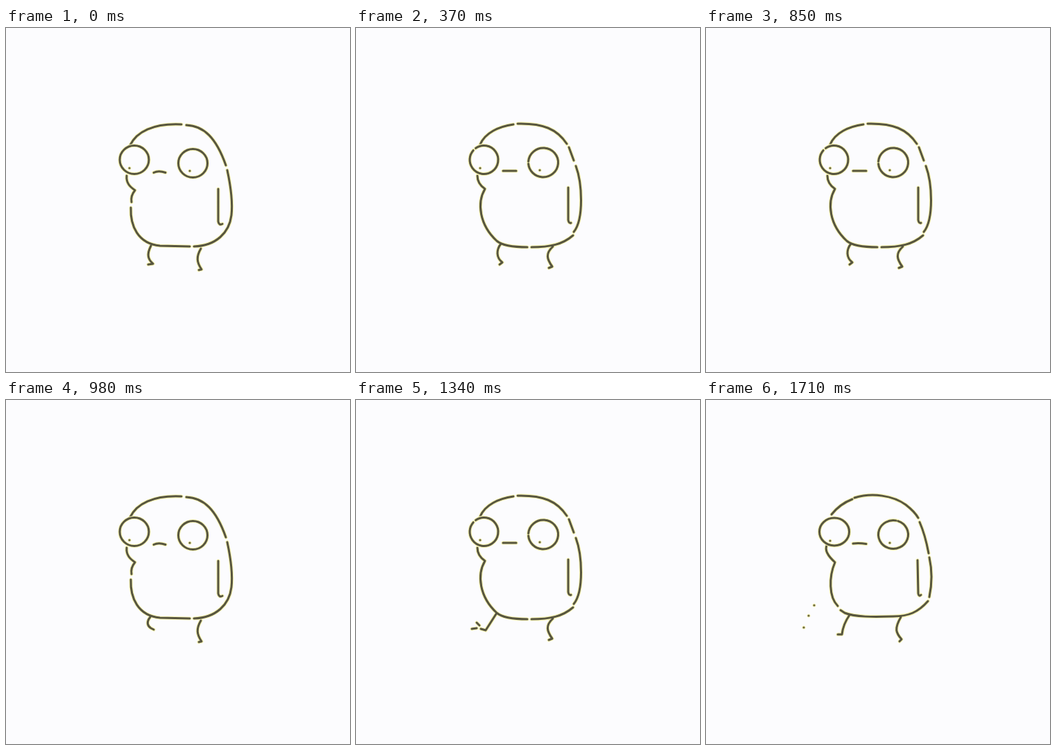
An HTML page with a canvas for the animation above (1.84 s loop, 496 px wide and 496 px high).

```html
<!DOCTYPE html>
<html lang="en">
<head>
<meta charset="utf-8">
<title>Little kick</title>
<style>
html, body { margin: 0; width: 100%; height: 100%; overflow: hidden; background: #fcfcfe; }
canvas { display: block; }
</style>
</head>
<body>
<canvas id="stage" width="496" height="496"></canvas>
<script>
const ctx = document.getElementById('stage').getContext('2d');
const LOOP = 1840;
const STARTS = [0, 120, 250, 370, 490, 610, 730, 850, 980, 1100, 1220, 1340, 1460, 1590, 1710];

// Four hand-drawn variants cycle to make the outline wobble.
// eyes: x, y, rx, ry, gap angle and gap size in degrees
const poses = [
  {
    body: 'M179 169C188 150 212 137 253 139M260 140C285 141 303 158 317 198M319 205C324 228 327 252 325 270C322 295 303 314 271 315M265 315L222 314C190 311 179 285 180 259M181 251C180 245 181 240 186 234C179 229 173 224 174 213',
    eyes: [[185, 190, 21, 20.5, 0, 0], [269.5, 195, 21, 20.5, 0, 0]],
    pupils: [[178, 202], [265, 206]],
    mouth: 'M213 208.5Q220 205 230 208.5',
    arm: 'M306 232L306 279Q307 285 312 282.5',
    left: 'M209 314C203 326 204 333 212 340L205 341',
    right: 'M281 318C274 330 275 338 282 348L278 349'
  },
  {
    body: 'M180 166C186 152 200 146 221 139M227 136.5C270 133 300 147 314 191M316 195C327 236 329 265 323 283C320 293 313 299 305 303M301 305C275 313 238 315 209 309C192 304 184 292 181 275M180 271C179 255 181 245 186 235C178 228 172 219 172 209',
    eyes: [[184.5, 189, 21.5, 20, 271, 12], [270, 193, 21.5, 20.5, 145, 10]],
    pupils: [[178, 201], [265, 205]],
    mouth: 'M212 208Q220 205 230 208',
    arm: 'M305 231C304 255 304 275 306 280Q308 284 311 282',
    left: 'M208 311C201 322 204 331 211 337L206 339',
    right: 'M283 312C273 325 273 333 282 345L278 347'
  },
  {
    body: 'M181 165C189 155 198 148 211 143M214 141C240 133 270 138 288 151C297 158 302 163 306 170M308 176C315 192 318 205 321 221M322 227C326 245 326 265 322 284M320 290C306 306 292 312 270 312C240 313 215 313 200 307L194 303M190 297C177 284 177 255 186 234C177 226 171 217 174 210',
    eyes: [[185, 190, 21.5, 20, 0, 0], [270, 194, 21.5, 20.5, 285, 8]],
    pupils: [[179, 203], [265, 206]],
    mouth: 'M212 207Q221 206 231 207.5',
    arm: 'M305 231L306 279Q307 284 310 281',
    left: 'M208 310C201 321 204 331 211 337L206 339',
    right: 'M281 313C271 330 274 336 282 345L279 348'
  },
  {
    body: 'M179 168C186 151 206 142 227 139M233 138C270 137 290 146 304 167M307 172L314 191M317 199C326 223 329 275 314 294M313 299C298 312 280 316 253 316M247 316C225 316 210 313 203 307C178 284 174 252 186 232C180 228 175 222 175 213',
    eyes: [[184.5, 190, 20.5, 20.5, 228, 13], [270, 194, 21.5, 21, 180, 9]],
    pupils: [[179, 202], [265, 205]],
    mouth: 'M212 206L231 206',
    arm: 'M306 230L306 277Q307 282 310 281',
    left: 'M209 311C202 320 202 331 211 338L207 341',
    right: 'M284 315C273 325 275 333 283 344L278 346'
  }
];

// Left leg during the wind-up and kick
const kick = {
  8: 'M208 313C202 320 204 326 209 329L213 331',
  9: 'M206 309C203 315 205 320 208 321L215 321',
  10: 'M205 309C205 316 210 320 218 317',
  11: 'M203 307L187 332L180 330M167 330L174 329M174 321L178 325',
  12: 'M204 309L188 333L181 331',
  13: 'M206 310C199 320 194 329 192 336L186 335',
  14: 'M207 310C200 320 197 329 196 338L190 338'
};
const specks = [[141, 328], [148, 311], [156, 296]];

function ink(path) {
  for (const [width, color] of [[5.2, '#f5f2b4'], [3, '#57553f']]) {
    ctx.lineWidth = width;
    ctx.strokeStyle = color;
    ctx.stroke(path);
  }
}

function dot(x, y) {
  for (const [r, color] of [[2.5, '#f5f2b4'], [1.6, '#68653f']]) {
    ctx.fillStyle = color;
    ctx.beginPath();
    ctx.arc(x, y, r, 0, Math.PI * 2);
    ctx.fill();
  }
}

function eye([x, y, rx, ry, gap, size]) {
  const path = new Path2D();
  const rad = Math.PI / 180;
  path.ellipse(x, y, rx, ry, 0, (gap + size / 2) * rad, (gap + 360 - size / 2) * rad);
  ink(path);
}

function draw(step) {
  const pose = poses[step % 4];
  ctx.fillStyle = '#fcfcfe';
  ctx.fillRect(0, 0, 496, 496);
  ctx.lineCap = ctx.lineJoin = 'round';
  const leg = kick[step] || pose.left;
  ink(new Path2D(pose.body + pose.mouth + pose.arm + leg + pose.right));
  pose.eyes.forEach(eye);
  pose.pupils.forEach(p => dot(...p));
  if (step > 11) {
    const k = (step - 11) / 3;
    specks.forEach(([x, y]) => dot(174 + (x - 174) * k, 325 + (y - 325) * k));
  }
}

function tick() {
  const t = performance.now() % LOOP;
  draw(STARTS.findLastIndex(start => start <= t));
  requestAnimationFrame(tick);
}
tick();
</script>
</body>
</html>
```
